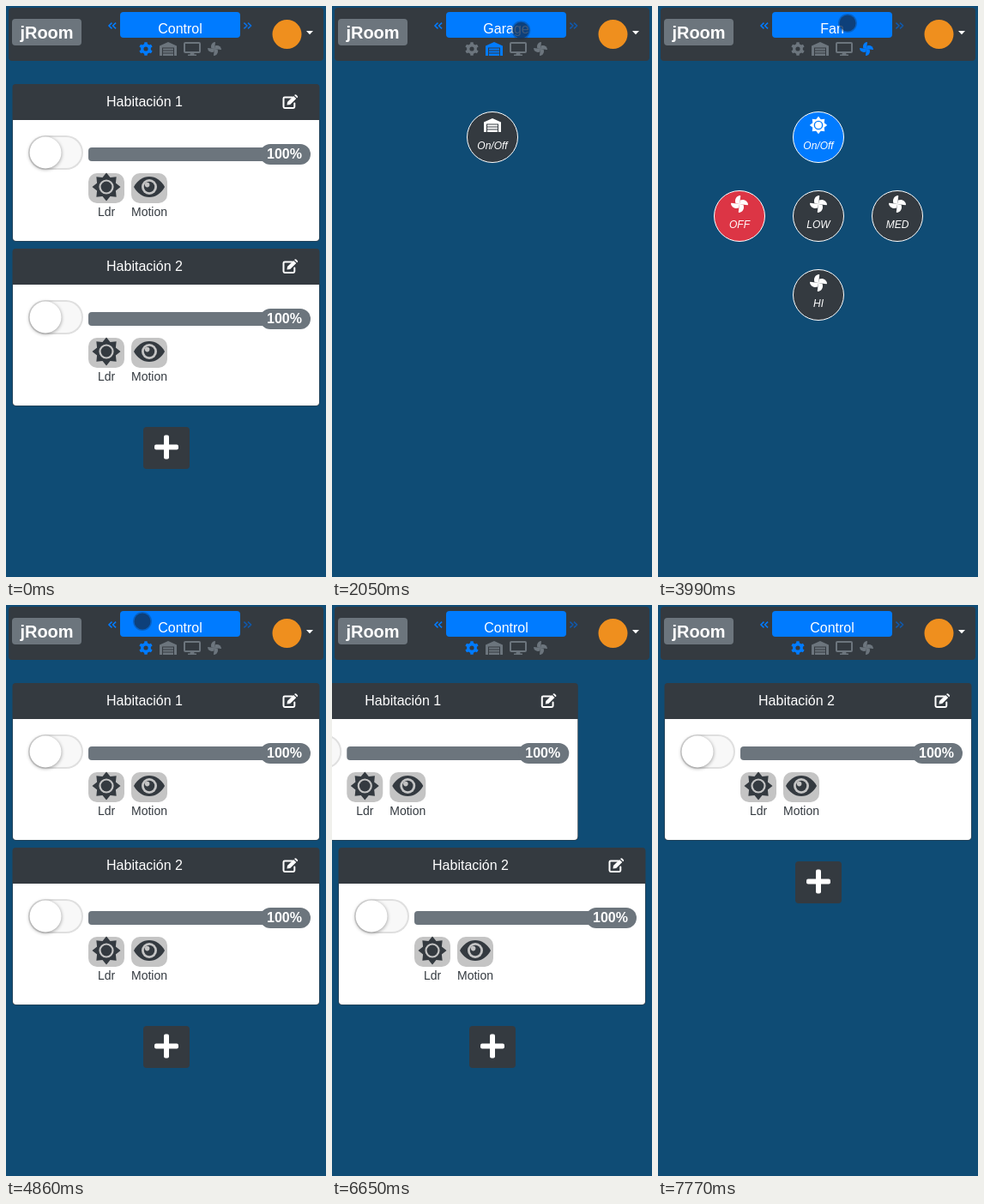
An HTML page with a canvas for the animation above (9.23 s loop, 373x666 px).

```html
<!DOCTYPE html>
<html lang="es">
<head>
<meta charset="utf-8">
<title>Control</title>
<style>
html, body { margin: 0; width: 100%; height: 100%; overflow: hidden; background: #0f4c75; }
canvas { display: block; width: 373px; height: 666px; }
</style>
</head>
<body>
<canvas id="stage"></canvas>
<script>
const W = 373, H = 666, LOOP = 9230;
const DARK = '#343a40', GRAY = '#6c757d', BLUE = '#007bff', RED = '#dc3545', WHITE = '#fff';
const canvas = document.getElementById('stage');
const dpr = window.devicePixelRatio || 1;
canvas.width = W * dpr;
canvas.height = H * dpr;
const ctx = canvas.getContext('2d');

// ---------- helpers ----------
function box(x, y, w, h, r, fill) {
  ctx.beginPath();
  ctx.roundRect(x, y, w, h, r);
  ctx.fillStyle = fill;
  ctx.fill();
}

function disc(x, y, r, fill) {
  ctx.beginPath();
  ctx.arc(x, y, r, 0, Math.PI * 2);
  ctx.fillStyle = fill;
  ctx.fill();
}

function text(str, x, y, font, fill = WHITE) {
  ctx.font = font + ' "Liberation Sans", Arial, sans-serif';
  ctx.textAlign = 'center';
  ctx.fillStyle = fill;
  ctx.fillText(str, x, y);
}

function at(x, y, scale, draw) {
  ctx.save();
  ctx.translate(x, y);
  ctx.scale(scale, scale);
  draw();
  ctx.restore();
}

function line(path, color, width, cap = 'round') {
  ctx.strokeStyle = color;
  ctx.lineWidth = width;
  ctx.lineCap = cap;
  ctx.lineJoin = 'round';
  ctx.stroke(path);
}

// Closed polygon from repeated [angle, radius] pairs
function ring(count, pairs) {
  const p = new Path2D();
  for (let i = 0; i < count; i++) {
    for (const [a, r] of pairs) {
      const ang = (i + a) * Math.PI * 2 / count - Math.PI / 2;
      p.lineTo(Math.cos(ang) * r, Math.sin(ang) * r);
    }
  }
  p.closePath();
  return p;
}

function hole(path, r) {
  path.moveTo(r, 0);
  path.arc(0, 0, r, 0, Math.PI * 2);
  return path;
}

// ---------- icons ----------
const gearPath = hole(ring(6, [[-0.3, 6], [-0.2, 8], [0.2, 8], [0.3, 6]]), 2.6);
const sunPath = hole(ring(8, [[0, 16.5], [0.5, 11.8]]), 8.6);
const bladePath = new Path2D('M0 0L32-238C33-249 24-257 13-256C-67-246-128-178-128-97C-128-68-123-42-115-19Z');
const shedPath = new Path2D('M-10-3.6L0-8L10-3.6V8H7V-1.5H-7V8H-10ZM-6-.5H6V1.5H-6ZM-6 2.5H6V4.5H-6ZM-6 5.5H6V8H-6Z');
const deskPath = new Path2D('M-8-7H8Q9-7 9-6V3Q9 4 8 4H-8Q-9 4-9 3V-6Q-9-7-8-7Z');
const standPath = new Path2D('M-2 4H2L2.6 6.4H5V8H-5V6.4H-2.6Z');
const eyePath = new Path2D('M-18 0C-14-7.5-7.5-12 0-12S14-7.5 18 0C14 7.5 7.5 12 0 12S-14 7.5-18 0Z');
const padPath = new Path2D('M2-5.6H-6.6Q-8-5.6-8-4.2V5.6Q-8 7-6.6 7H3.4Q4.8 7 4.8 5.6V1.6');
const pencilPath = new Path2D('M-4 3.4L-3.5 0L3.6-7.1L6.8-3.9L-.3 3.1ZM4.5-8L5.3-8.6Q6.2-9 7-8.2L8.2-7Q9-6.2 8.5-5.4L7.7-4.7Z');
const minusPath = new Path2D('M-4.5 0H4.5');
const plusPath = new Path2D('M-4.5 0H4.5M0-4.5V4.5');
const chevron = new Path2D('M2-4.2L-2.2 0L2 4.2');
const angles = new Path2D('M0-3.4L-3.6 0L0 3.4M4.6-3.4L1 0L4.6 3.4');

const icons = {
  gear(c) { ctx.fillStyle = c; ctx.fill(gearPath, 'evenodd'); },
  shed(c) { ctx.fillStyle = c; ctx.fill(shedPath); },
  desk(c) {
    line(deskPath, c, 2);
    ctx.fillStyle = c;
    ctx.fill(standPath);
  },
  fan(c) {
    ctx.scale(1 / 32, 1 / 32);
    ctx.fillStyle = c;
    for (let i = 0; i < 4; i++) {
      ctx.fill(bladePath);
      ctx.rotate(Math.PI / 2);
    }
  },
  sun(c) {
    ctx.fillStyle = c;
    ctx.fill(sunPath, 'evenodd');
    disc(0, 0, 6.4, c);
  },
  eye(c) {
    ctx.fillStyle = c;
    ctx.fill(eyePath);
    disc(0, 0, 9, '#c4c4c4');
    disc(0, 0, 6.2, c);
    disc(-2.4, -2.4, 2.8, '#c4c4c4');
  },
  edit(c) {
    line(padPath, c, 2);
    ctx.fillStyle = c;
    ctx.fill(pencilPath);
  },
  power(c) {
    const p = new Path2D();
    p.arc(0, 0.5, 8, -0.9, Math.PI + 0.9);
    p.moveTo(0, -8.5);
    p.lineTo(0, 0);
    line(p, c, 2.9);
  },
  minus(c, bg) { disc(0, 0, 10, c); line(minusPath, bg, 3); },
  plus(c, bg) { disc(0, 0, 10, c); line(plusPath, bg, 3); },
  prev(c, bg) { disc(0, 0, 10, c); line(chevron, bg, 2.8); },
  next(c, bg) { ctx.scale(-1, 1); icons.prev(c, bg); }
};

function icon(name, x, y, color, scale = 1, bg = DARK) {
  at(x, y, scale, () => icons[name](color, bg));
}

// ---------- header ----------
const titles = ['Control', 'Garage', 'TV', 'Fan'];
const tabs = [['gear', 163], ['shed', 189], ['desk', 217], ['fan', 243]];

function header(page, touched) {
  box(3, 2, 367, 62, 4, DARK);
  box(7, 15, 81, 31, 4, GRAY);
  text('jRoom', 47.5, 38, 'bold 20px');
  at(123.5, 23, 1, () => line(angles, BLUE, 1.6, 'butt'));
  at(282, 23, 1, () => {
    ctx.scale(-1, 1);
    line(angles, touched ? '#0f59ad' : '#0a70e4', 1.6, 'butt');
  });
  box(133, 7, 140, 30, 4, BLUE);
  text(titles[page], 203, 32, '16px');
  tabs.forEach(([name, x], i) => icon(name, x, 50, i === page ? BLUE : GRAY));
  disc(327.5, 33, 17, '#ef8f1e');
  ctx.fillStyle = WHITE;
  ctx.fill(new Path2D('M350 29H358L354 33.2Z'));
}

// ---------- pages ----------
function chip(name, x, label) {
  box(x - 21, 195, 42, 35, 10, '#c4c4c4');
  icon(name, x, 211, DARK);
  text(label, x, 245, '14px', DARK);
}

function card(title, dx, dy) {
  at(dx, dy, 1, () => {
    box(7.5, 91, 358, 183.5, 4, DARK);
    box(8, 133, 357, 141, [0, 0, 4, 4], WHITE);
    text(title, 161.5, 117, '16px');
    icon('edit', 331.5, 112, WHITE);

    box(26, 151, 64, 40, 20, '#dfdfdf');
    box(28, 153, 60, 36, 18, '#f8f8f8');
    ctx.save();
    ctx.shadowColor = 'rgba(0,0,0,.4)';
    ctx.shadowBlur = 4 * dpr;
    ctx.shadowOffsetY = dpr;
    disc(46, 171, 18.5, WHITE);
    ctx.restore();

    box(96, 165, 220, 16, 4, GRAY);
    box(296, 161, 59, 24, 12, GRAY);
    text('100%', 324.5, 178, 'bold 16px');
    chip('sun', 117, 'Ldr');
    chip('eye', 167, 'Motion');
  });
}

function addButton(y) {
  box(160, y, 54, 49, 4, DARK);
  box(173, y + 20.5, 28, 6, 2, WHITE);
  box(184, y + 9.5, 6, 28, 2, WHITE);
}

const SWIPE_AWAY = 6290, REMOVED = 6850;

function control(t) {
  if (t >= REMOVED) {
    card('Habitación 2', 0, 0);
    addButton(299);
    return;
  }
  const u = Math.max(0, (t - SWIPE_AWAY) / (REMOVED - SWIPE_AWAY));
  card('Habitación 1', -366 * Math.pow(u, 3.5), 0);
  card('Habitación 2', 0, 192);
  addButton(491);
}

function round(col, row, label, name, fill = DARK, scale = 1) {
  const x = 95 + col * 92, y = 153 + row * 92;
  disc(x, y, 29.5, fill);
  ctx.strokeStyle = WHITE;
  ctx.lineWidth = 1;
  ctx.stroke();
  if (name) {
    icon(name, x, y - 14, WHITE, scale, fill);
    text(label, x, y + 13.5, 'italic 12px');
  } else {
    text(label, x, y - 7, '20px');
    box(x - 7.5, y + 15, 15, 1, 0, WHITE);
  }
}

function garage() {
  round(1, 0, 'On/Off', 'shed');
}

function tv() {
  round(0, 0, 'Vol', 'minus');
  round(1, 0, 'On/Off', 'power', RED);
  round(2, 0, 'Vol', 'plus');
  for (let n = 1; n < 10; n++) round((n - 1) % 3, Math.ceil(n / 3), String(n));
  round(0, 4, 'Prog', 'prev');
  round(1, 4, '0');
  round(2, 4, 'Prog', 'next');
}

function fan() {
  round(1, 0, 'On/Off', 'sun', BLUE, 0.62);
  round(0, 1, 'OFF', 'fan', RED, 1.25);
  round(1, 1, 'LOW', 'fan', DARK, 1.25);
  round(2, 1, 'MED', 'fan', DARK, 1.25);
  round(1, 2, 'HI', 'fan', DARK, 1.25);
}

const pages = [control, garage, tv, fan];

// ---------- pointer ----------
const swipes = [1510, 2520, 3520, 4520];

// Out to the left and back to rest, as [time, x, y]
const swipePath = (s, i) => {
  const low = i ? 0 : 7;
  return [
    [s, 218, 33], [s + 130, 219, 22 + low], [s + 330, 159, 19 + low],
    [s + 400, 159, 19 + low], [s + 470, 221, 20 + low], [s + 700, 218, 33]
  ];
};

const track = [
  [970, 333, 18], [1310, 218, 33],
  ...swipes.flatMap(swipePath),
  [5430, 218, 33], [5650, 208, 55], [5950, 205, 215],
  [6050, 195, 220], [6260, 20, 345], [6320, -20, 345],
  [7640, 57, 273], [7710, 20, 304], [7770, 17, 306]
];

function pointer(t) {
  const shown = (t >= 970 && t < 6320) || (t >= 7640 && t < 7770);
  if (!shown) return;
  const i = track.findIndex(k => k[0] > t);
  const [t0, x0, y0] = track[i - 1], [t1, x1, y1] = track[i];
  const u = (t - t0) / (t1 - t0), e = u * u * (3 - 2 * u);
  const x = x0 + (x1 - x0) * e, y = y0 + (y1 - y0) * e;
  const down = swipes.some(s => t >= s + 100 && t < s + 560) || (t >= 5980 && t < 6320);
  if (down) {
    disc(x, y, 11, 'rgba(18,50,90,.35)');
    disc(x, y, 9.5, 'rgba(18,50,90,.7)');
  } else {
    disc(x, y, 12, 'rgba(200,190,0,.68)');
  }
}

// ---------- loop ----------
function draw(t) {
  ctx.setTransform(dpr, 0, 0, dpr, 0, 0);
  ctx.fillStyle = '#0f4c75';
  ctx.fillRect(0, 0, W, H);
  const page = swipes.filter(s => t >= s + 270).length % pages.length;
  header(page, t >= 970);
  pages[page](t);
  pointer(t);
}

const start = performance.now();
function tick() {
  draw((performance.now() - start) % LOOP);
  requestAnimationFrame(tick);
}
tick();
</script>
</body>
</html>
```
